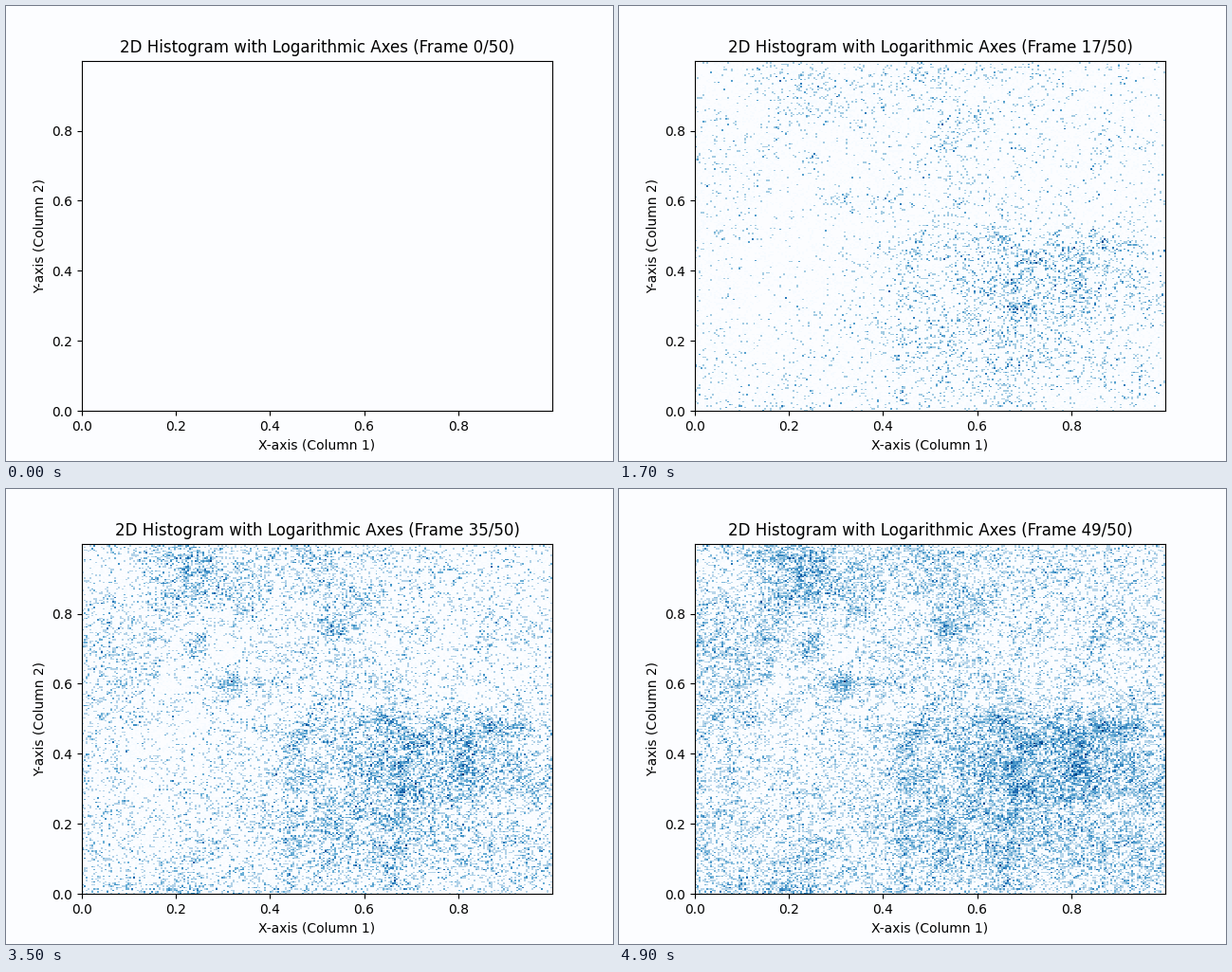
A matplotlib script for the animation above (5 s loop, 640x480 px).

```python
import numpy as np
import matplotlib.pyplot as plt
from matplotlib.animation import FuncAnimation
from matplotlib.colors import LogNorm

FRAMES = 50
BINS = 250
POINTS_PER_FRAME = 1750
UPPER = 0.99999
PAPER = "#fcfdff"

# Middles of the strongest clusters
CLUSTERS = [(0.17, 0.75), (0.25, 0.71), (0.35, 0.79), (0.53, 0.76),
            (0.31, 0.61), (0.46, 0.41), (0.84, 0.61), (0.92, 0.48)]

rng = np.random.default_rng(12)
edges = np.linspace(0, UPPER, BINS + 1)
centers = (edges[:-1] + edges[1:]) / 2
X, Y = np.meshgrid(centers, centers)


def spot(x, y, width, height):
    return np.exp(-((X - x) / width) ** 2 / 2 - ((Y - y) / height) ** 2 / 2)


def cloud_noise():
    """Random texture with equal strength at every scale."""
    freq = np.fft.fftfreq(BINS, 1 / BINS)
    scale = np.maximum(np.hypot(freq, freq[:, None]), 1)
    noise = np.fft.ifft2(np.fft.fft2(rng.normal(size=(BINS, BINS))) / scale).real
    return noise / noise.std()


def make_density():
    log_density = 0.4 * cloud_noise()
    for x, y in CLUSTERS:
        log_density += 0.8 * spot(x, y, 0.022, 0.022)
    log_density += 0.5 * spot(0.75, 0.47, 0.2, 0.04)
    log_density -= 0.4 * spot(0.75, 0.72, 0.1, 0.1)
    return np.exp(log_density)


def band(frame):
    """Part of the x range being filled: it narrows, then drifts left and wraps."""
    middle = 0.6 + 0.06 * (FRAMES - 1 - frame)
    width = np.interp(frame, [10, 18], [1, 0.5])
    return np.abs((X - middle + 0.5) % 1 - 0.5) <= width / 2


def accumulate():
    density = make_density()
    counts = np.zeros((FRAMES, BINS, BINS), dtype=int)
    for frame in range(1, FRAMES):
        weights = (density * band(frame)).ravel()
        added = rng.multinomial(POINTS_PER_FRAME, weights / weights.sum())
        counts[frame] = counts[frame - 1] + added.reshape(BINS, BINS)
    return counts


counts = accumulate()

fig, ax = plt.subplots(figsize=(6.4, 4.8), dpi=100, facecolor=PAPER)
ax.set_facecolor(PAPER)
norm = LogNorm(vmin=1, vmax=2)
mesh = ax.pcolormesh(edges, edges, np.ma.masked_equal(counts[0], 0),
                     cmap="Blues", norm=norm)
ax.set_xlim(0, UPPER)
ax.set_ylim(0, UPPER)
ax.set_xlabel("X-axis (Column 1)")
ax.set_ylabel("Y-axis (Column 2)")
title = ax.set_title("")


def update(frame):
    norm.vmax = max(2, counts[frame].max())
    mesh.set_array(np.ma.masked_equal(counts[frame], 0))
    title.set_text(f"2D Histogram with Logarithmic Axes (Frame {frame}/{FRAMES})")
    return mesh, title


anim = FuncAnimation(fig, update, frames=FRAMES, interval=100, repeat=True,
                     repeat_delay=0, blit=False)
plt.show()
```
